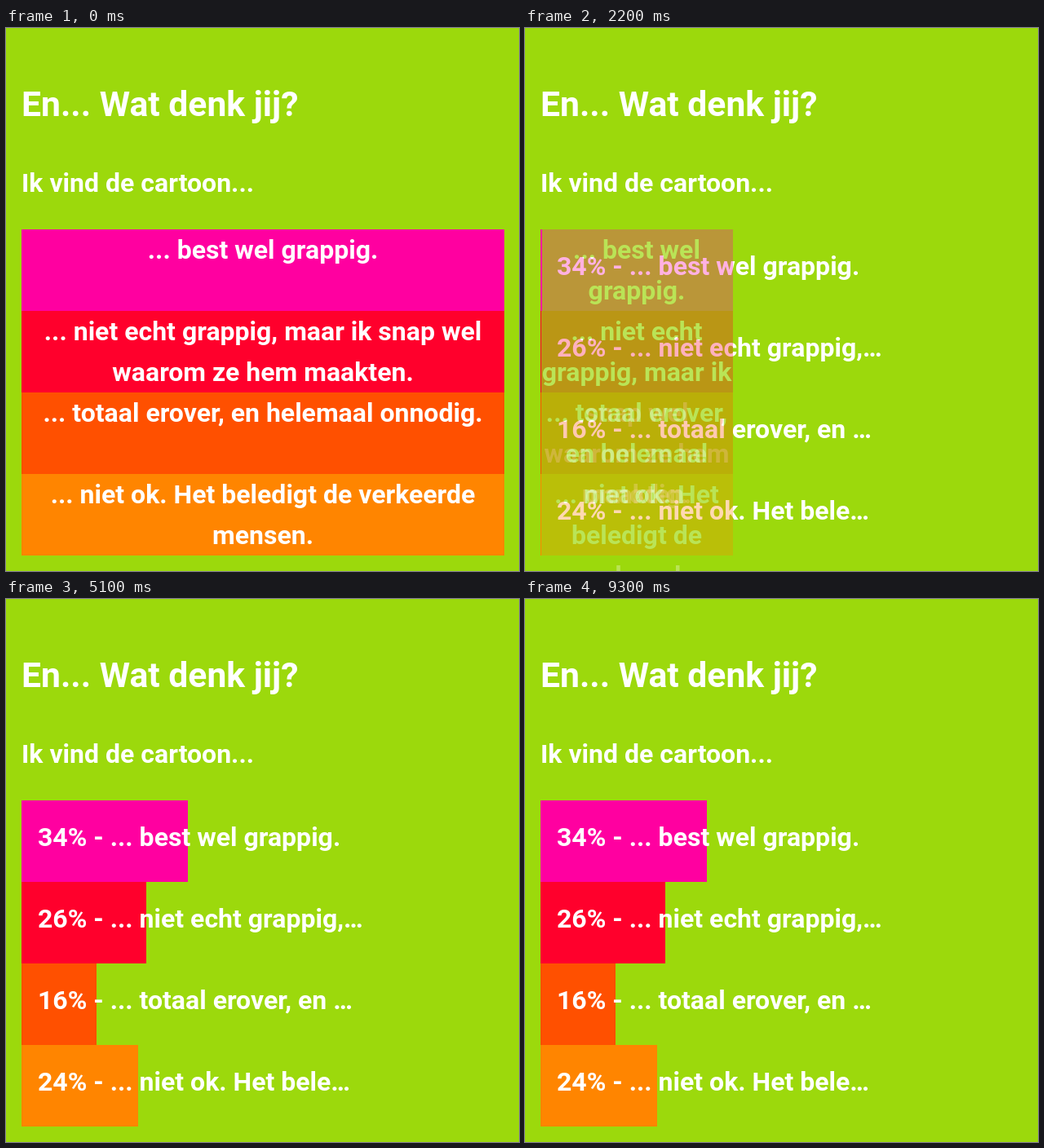
Write an HTML page that moves like this. It is 629 px wide and 666 px high and loops after 9.4 s.

```html
<!DOCTYPE html>
<html lang="nl">
<head>
<meta charset="utf-8">
<style>
  html, body { margin: 0; width: 100%; height: 100%; overflow: hidden; background: #9cd90c; }
  body { position: relative; font: bold 32px/50px Roboto, sans-serif; color: #fff; }
  h1, h2, .bar, .result, .option { position: absolute; left: 19px; margin: 0; }
  h1 { top: 68px; font-size: 42.67px; line-height: 50px; }
  h2 { top: 165px; font-size: 32px; }
  .bar, .option { height: 100px; }
  .result { left: 39px; white-space: nowrap; }
  .option { text-align: center; }
</style>
</head>
<body>
<h1>En... Wat denk jij?</h1>
<h2>Ik vind de cartoon...</h2>
<script>
const LOOP = 9400, STEP = 100, WIDTH = 592, TOP = 247, ROW = 100;
const VOTES = 58, FADE_START = 1974, GROW_START = 2178, DURATION = 400;

const answers = [
  { color: '#ff00a0', votes: 20, text: '... best wel grappig.', short: '34% - ... best wel grappig.' },
  { color: '#ff002c', votes: 15, text: '... niet echt grappig, maar ik snap wel waarom ze hem maakten.', short: '26% - ... niet echt grappig,…' },
  { color: '#ff5000', votes: 9, text: '... totaal erover, en helemaal onnodig.', short: '16% - ... totaal erover, en …' },
  { color: '#ff8500', votes: 14, text: '... niet ok. Het beledigt de verkeerde mensen.', short: '24% - ... niet ok. Het bele…' }
];

function add(className, top, text, color) {
  const el = document.createElement('div');
  el.className = className;
  el.textContent = text;
  el.style.top = top + 'px';
  el.style.background = color;
  document.body.append(el);
  return el;
}

const rowTop = i => TOP + i * ROW;
const bars = answers.map((a, i) => add('bar', rowTop(i), '', a.color));
const results = answers.map((a, i) => add('result', rowTop(i) + 20, a.short, 'none'));
const options = answers.map((a, i) => add('option', rowTop(i), a.text, a.color));

function swing(time, start) {
  const p = Math.min(1, Math.max(0, (time - start) / DURATION));
  return (1 - Math.cos(Math.PI * p)) / 2;
}

function draw(time) {
  const left = 1 - swing(time, FADE_START);
  const grown = swing(time, GROW_START);
  answers.forEach((a, i) => {
    bars[i].style.width = Math.round(WIDTH * a.votes / VOTES * grown) + 'px';
    results[i].style.display = time >= GROW_START ? 'block' : 'none';
    const style = options[i].style;
    style.display = left > 0 ? 'block' : 'none';
    style.width = WIDTH * left + 'px';
    style.opacity = left ** 1.3;
  });
}

const begin = performance.now();
function frame() {
  const time = (performance.now() - begin) % LOOP;
  draw(Math.floor(time / STEP) * STEP);
  requestAnimationFrame(frame);
}
frame();
</script>
</body>
</html>
```
